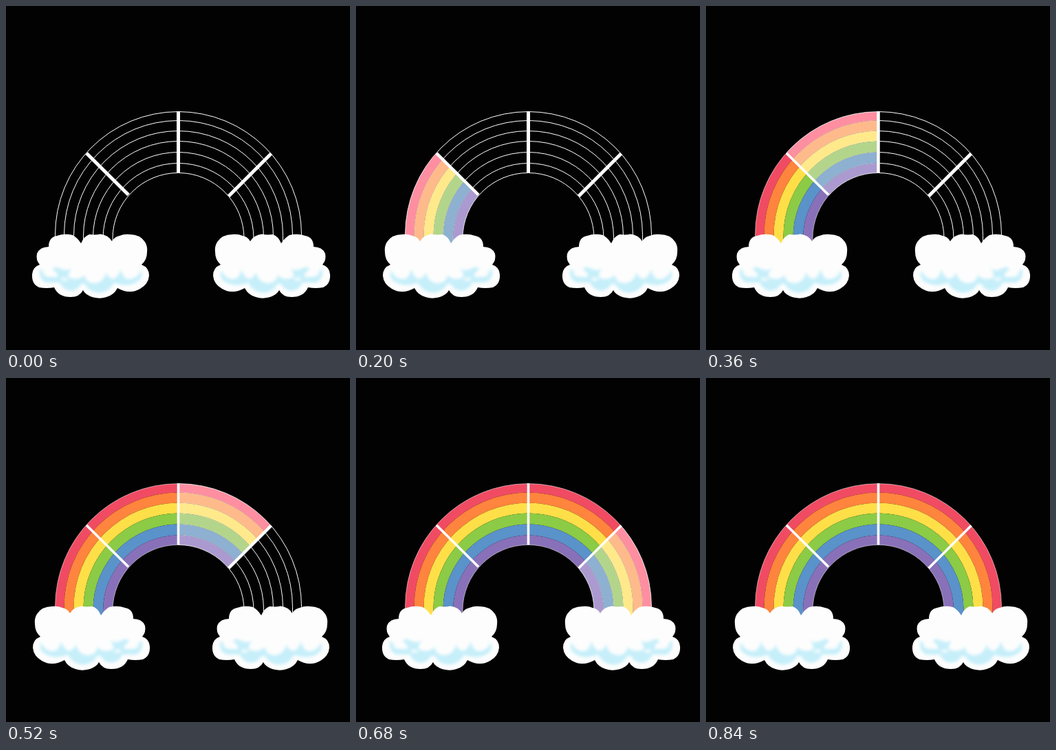
Recreate the animation shown at these times as an HTML page. Size 500 by 500 pixels, loop 1 s.

```html
<!DOCTYPE html>
<html lang="en">
<head>
<meta charset="utf-8">
<title>Rainbow loader</title>
<style>
  html, body { margin: 0; width: 100%; height: 100%; overflow: hidden; background: #020202; }
  svg { display: block; width: 100vw; height: 100vh; }
  .line { fill: none; stroke: #fff; stroke-width: 1; }
  .spoke { stroke: #fff; }
</style>
</head>
<body>
<svg id="stage" viewBox="0 0 500 500">
  <defs>
    <filter id="soft" x="-20%" y="-40%" width="140%" height="180%">
      <feGaussianBlur stdDeviation="2.2"/>
    </filter>
    <path id="puff" d="M62 350 Q62 336 74 334 Q85 330 97 333 Q104 337 109 345
      Q113 335 121 332 Q131 333 137 331.500 Q149 333 154 342 Q158 335 165 334 Q172 331 180 332
      Q195 332 202 343 Q206 349 205 358 Q205 369 197 376 Q208 380 208 392
      Q207 404 195 411 Q180 420 162 410 Q157 420 146 423 Q137 426 127 423.500
      Q115 420 112 413 Q107 423 94 423 Q76 423 70 409 Q59 411 48 409
      Q37 404 38 390 Q39 379 49 376 Q43 369 45 360 Q49 350 62 350 Z"/>
    <clipPath id="puffClip"><use href="#puff"/></clipPath>
    <g id="cloud">
      <use href="#puff" fill="#fdfdfd"/>
      <g clip-path="url(#puffClip)">
        <g filter="url(#soft)" fill="#c6effa">
          <path d="M50 381 Q46 396 58 402 L78 402 Q83 413 94 414 Q105 413 109 404 L115 404
            Q119 415 135 417 Q151 415 157 402 Q174 409 187 403 Q201 397 196 384
            Q190 398 177 397 Q170 396 167 383 Q163 394 156 397 Q146 394 146 386
            Q142 403 127 403 Q116 402 114 391 Q107 399 95 396 Q86 394 96 381
            Q88 387 78 381 Q70 377 68 383 Q78 390 74 394 Q60 396 50 381 Z"/>
        </g>
        <g filter="url(#soft)" fill="#fdfdfd" opacity=".7">
          <ellipse cx="61" cy="389" rx="7" ry="5"/>
          <ellipse cx="85" cy="397" rx="6" ry="3"/>
        </g>
      </g>
    </g>
  </defs>
  <g id="bow"></g>
  <g id="spokes"></g>
  <g id="clouds"></g>
</svg>
<script>
const $ = id => document.getElementById(id);
const CX = 250.5, BASE = 345;
const STARTS = [0, 200, 360, 520, 680, 840], LOOP = 1000;

// Arch edges from outside in: [radius, top]
const EDGES = [[179, 153.5], [166, 166.5], [152, 181.5], [138, 196.5],
               [124, 212.5], [109.5, 228.5], [95.5, 242.5]];
const BRIGHT = ['#f04b63', '#ff843d', '#ffdf48', '#8ccb45', '#5a92ca', '#8971b9'];
const PALE = ['#ff8ea1', '#ffba8b', '#ffe98b', '#b3d58b', '#8eb0d1', '#ab9ad0'];

// Wedges that split the arch into four sections
const WEDGES = [
  '250.5,345.5 50,148 0,148 0,346 250.5,346',
  '250.5,346 50,148 50,100 250.5,100',
  '250.5,348 250.5,100 450,100 450,150',
  '250.5,349 450,150 500,150 500,346 253,346'
];
const SPOKES = [[117, 214, 178, 274.5], [250.5, 153, 250.5, 242.5], [385.5, 214.5, 323.5, 276.5]];

function add(parent, tag, attrs) {
  const el = document.createElementNS('http://www.w3.org/2000/svg', tag);
  for (const k in attrs) el.setAttribute(k, attrs[k]);
  return parent.appendChild(el);
}

function arch([r, top]) {
  const y = top + r;
  return `M${CX - r} ${BASE}V${y}A${r} ${r} 0 0 1 ${CX + r} ${y}V${BASE}`;
}

function drawLines(g, edges, opacity) {
  edges.forEach(e => add(g, 'path', { d: arch(e), class: 'line', opacity }));
}

function drawBands(g, colors) {
  colors.forEach((fill, i) => add(g, 'path', {
    d: arch(EDGES[i]) + 'Z' + arch(EDGES[i + 1]) + 'Z', fill, 'fill-rule': 'evenodd'
  }));
}

const sections = WEDGES.map((points, i) => {
  const clip = add(document.querySelector('defs'), 'clipPath', { id: 'wedge' + i });
  add(clip, 'polygon', { points });
  const g = add($('bow'), 'g', { 'clip-path': `url(#wedge${i})` });
  const [empty, pale, bright] = [0, 1, 2].map(() => add(g, 'g', {}));
  const rims = [EDGES[0], EDGES[6]];
  drawLines(empty, EDGES, 1);
  drawBands(pale, PALE);
  drawLines(pale, EDGES.slice(1, 6), 0.3);
  drawLines(pale, rims, 0.8);
  drawBands(bright, BRIGHT);
  drawLines(bright, rims, 0.5);
  return [empty, pale, bright];
});

const spokes = SPOKES.map(([x1, y1, x2, y2]) =>
  add($('spokes'), 'line', { x1, y1, x2, y2, class: 'spoke' }));

const clouds = [0, 1].map(() => add($('clouds'), 'use', { href: '#cloud' }));
const plain = x => `translate(${x} 0)`;
const flipped = x => `translate(${x} 0) scale(-1 1)`;

const level = (step, i) => Math.max(0, Math.min(2, step - i));

function show(step) {
  sections.forEach((layers, i) => layers.forEach((g, n) =>
    g.setAttribute('display', n === level(step, i) ? 'inline' : 'none')));
  spokes.forEach((s, i) => {
    const filled = (level(step, i) > 0) + (level(step, i + 1) > 0);
    s.setAttribute('stroke-width', [5, 4.5, 3.6][filled]);
  });
  const odd = step % 2;
  clouds[0].setAttribute('transform', odd ? flipped(247) : plain(0));
  clouds[1].setAttribute('transform', odd ? plain(262) : flipped(509));
}

let last = -1;
function tick() {
  const t = performance.now() % LOOP;
  const step = STARTS.filter(s => s <= t).length - 1;
  if (step !== last) show(last = step);
  requestAnimationFrame(tick);
}
tick();
</script>
</body>
</html>
```
